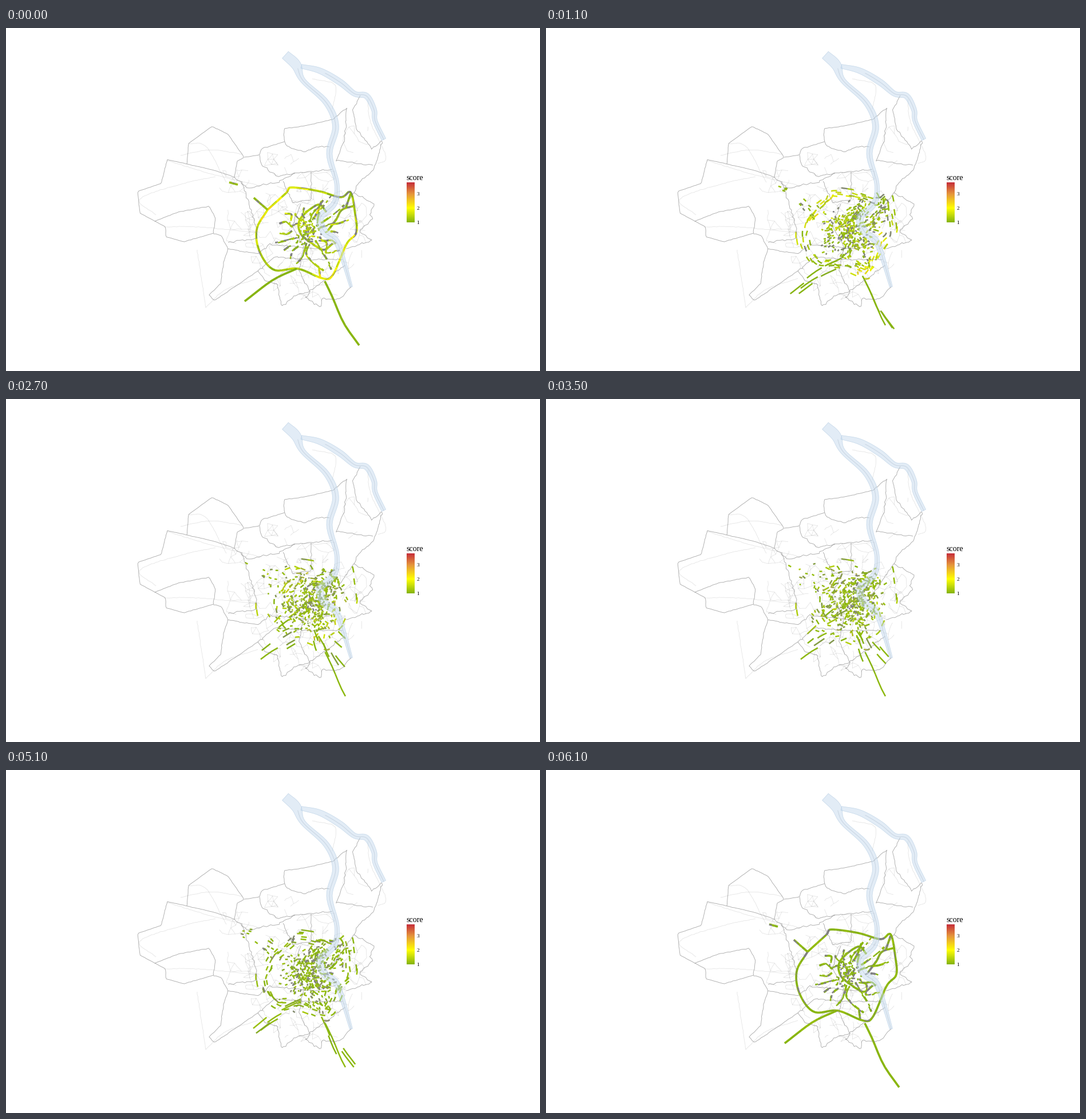
Animation, 933 px wide and 600 px high, one loop 8000 ms. Source, as a matplotlib script:

```python
import numpy as np
import matplotlib.pyplot as plt
from matplotlib.animation import FuncAnimation
from matplotlib.collections import LineCollection
from matplotlib.colors import LinearSegmentedColormap
from matplotlib.patches import Polygon

W, H, DPI = 933, 600, 100
PX = 72 / DPI
STEPS = 29
CENTRE = np.array([528, 358])
rng = np.random.default_rng(12)

SCORE = LinearSegmentedColormap.from_list("score", [
    (0, "#86b410"), (1 / 2.8, "#ffff00"), (2 / 2.8, "#e5953c"), (1, "#c62f3a")])
MISSING = (0.5, 0.5, 0.5, 1)

fig = plt.figure(figsize=(W / DPI, H / DPI), dpi=DPI, facecolor="white")
ax = fig.add_axes([0, 0, 1, 1])


def points(flat, size=2):
    return np.array(flat, float).reshape(-1, size)


def smooth(pts, n=8):
    """Catmull-Rom curve through the points."""
    p = np.vstack([2 * pts[0] - pts[1], pts, 2 * pts[-1] - pts[-2]])
    t = np.linspace(0, 1, n, endpoint=False)[:, None]
    out = [0.5 * (2 * b + (c - a) * t + (2 * a - 5 * b + 4 * c - d) * t**2
                  + (3 * b - a - 3 * c + d) * t**3)
           for a, b, c, d in zip(p, p[1:], p[2:], p[3:])]
    return np.vstack(out + [pts[-1:]])


def measure(pts):
    return np.r_[0, np.cumsum(np.hypot(*np.diff(pts, axis=0).T))]


def along(pts, at):
    d = measure(pts)
    return np.column_stack([np.interp(at, d, pts[:, 0]), np.interp(at, d, pts[:, 1])])


def normals(pts):
    g = np.gradient(pts, axis=0)
    g /= np.hypot(*g.T)[:, None] + 1e-9
    return np.column_stack([-g[:, 1], g[:, 0]])


def rough(pts, amount):
    """Resample a line and give it small kinks; its ends stay put."""
    total = measure(pts)[-1]
    line = along(pts, np.linspace(0, total, max(3, int(total / 4))))
    kinks = rng.normal(0, amount, line.shape)
    kinks[[0, -1]] = 0
    return line + kinks


# base map: municipal limits and local roads
borders, lanes = [], []


def border(*xy, kink=0.8):
    borders.append(rough(points(xy), kink))


def lane(*xy):
    lanes.append(rough(smooth(points(xy)), 0.3))


def web(cx, cy, rx, ry, gap):
    """Streets on a loose grid that fills an ellipse."""
    gx, gy = np.meshgrid(np.arange(-rx, rx + 1, gap), np.arange(-ry, ry + 1, gap))
    p = np.column_stack([gx.ravel(), gy.ravel()])
    p = p[np.hypot(p[:, 0] / rx, p[:, 1] / ry) < 1]
    p = p + rng.uniform(-.42, .42, p.shape) * gap + (cx, cy)
    for i, a in enumerate(p):
        for b in p[i + 1:]:
            if np.hypot(*(a - b)) < 1.25 * gap and rng.random() < .75:
                lanes.append(rough(np.array([a, b]), 0.5))


border(399, 261, 368, 250, 282, 230, 271, 272, 230, 286, 234, 324, 279, 348, 279, 365,
       311, 374, 362, 359, kink=.2)
border(260, 338, 300, 322, 355, 312, 366, 332, 362, 359, 376, 363, 388, 386, 380, 410,
       375, 447, 355, 467, 364, 477, 440, 425, kink=.3)
border(316, 238, 319, 202, 360, 172, 388, 186, 416, 226, 404, 233, 399, 261, kink=.2)
border(416, 226, 443, 222, 446, 211, 487, 199, 485, 176, 523, 171, 571, 160, kink=.3)
border(487, 199, 490, 207, 522, 217, 540, 208, 565, 208)
border(443, 222, 445, 238, 475, 260, 505, 254, 570, 247)
border(571, 160, 595, 139, 592, 195, 577, 232, 620, 238, 641, 240)
border(619, 118, 606, 142, 612, 175, 640, 212, 657, 196, 650, 225, 641, 251, 616, 270, 608, 288)
border(608, 288, 644, 308, 636, 326, 641, 332, 618, 356, 640, 372, 594, 386)
border(440, 425, 452, 441, 474, 448, 482, 487, 505, 468, 530, 461, 524, 472, 550, 488,
       553, 472, 582, 475, 603, 453)
border(399, 261, 420, 280, 475, 270, 505, 254)
border(484, 268, 500, 305, 533, 300, 533, 252)
border(412, 268, 433, 335, 440, 368, 388, 375)
border(388, 386, 440, 395, 462, 379, 540, 386, 576, 376)
border(440, 425, 470, 401, 530, 405, 588, 405)
border(515, 308, 500, 345, 520, 384, 512, 424, 530, 461, 592, 415)
border(608, 288, 576, 335, 560, 346)

lane(535, 89, 575, 100, 570, 142)
lane(632, 124, 637, 165, 664, 225, 650, 237)
lane(305, 223, 358, 213, 413, 221)
lane(319, 202, 350, 208, 385, 270)
lane(282, 232, 365, 257, 445, 276)
lane(262, 327, 234, 299, 310, 272, 366, 260)
lane(277, 348, 335, 348, 440, 358)
lane(334, 388, 349, 489)
lane(349, 489, 383, 458, 440, 438)

web(520, 358, 112, 92, 11)
web(478, 236, 34, 26, 11)
web(400, 268, 36, 28, 12)
web(410, 330, 40, 50, 18)
web(612, 200, 34, 48, 17)
web(612, 335, 28, 48, 14)
web(520, 452, 62, 28, 13)
web(545, 262, 50, 26, 16)

# scored stretches of road: geometry, first colour, last colour
shapes, first, last, held = [], [], [], []


def add(piece, warmth, missing, hold=False):
    """Scores run higher towards the north-west and south-east."""
    dx, dy = piece.mean(axis=0) - CENTRE
    mean = 1 + warmth * (1 + .6 * np.sin(2 * np.arctan2(dy, dx)))
    shapes.append(piece)
    held.append(hold)
    for out, mu, spread in ((first, mean, .5 * warmth), (last, 1.04, .08)):
        score = np.clip(rng.normal(mu, spread), 1, 3.8)
        out.append(MISSING if rng.random() < missing else SCORE((score - 1) / 2.8))


def road(xy, size, warmth=0.25, missing=0.2, skip=0.0, hold=()):
    """Cut both carriageways of a road into short pieces."""
    line = smooth(points(xy))
    for side in (-.6, .6):
        path = line + side * normals(line)
        total = measure(path)[-1]
        cuts = np.linspace(0, total, max(1, round(total / size)) + 1)
        for n, (a, b) in enumerate(zip(cuts, cuts[1:])):
            if rng.random() >= skip:
                add(along(path, np.linspace(a, b, 4)), warmth, missing, side < 0 and n in hold)


# ring road and motorways
road((457, 318, 490, 288, 498, 279, 545, 285, 585, 296, 602, 287, 610, 325, 612, 358, 595, 378,
      571, 432, 553, 438, 510, 421, 468, 423, 443, 391, 438, 352, 457, 318), 11, .55, .12)
road((417, 478, 466, 441, 508, 421), 34, .02, 0, hold=(1,))
road((557, 443, 570, 470, 590, 516, 617, 555), 43, .02, 0, hold=(0, 1))
# boulevards
road((540, 381, 515, 360, 514, 334, 545, 309, 560, 322), 6)
road((562, 355, 577, 335, 587, 318, 609, 311), 7)
road((540, 381, 556, 388, 571, 377), 7)
road((551, 303, 546, 318, 538, 333), 5, 1)
road((602, 290, 594, 314), 5, .2, .4)
road((390, 270, 405, 274), 5, .1, .4)
road((433, 297, 457, 318), 6, .1)
road((547, 420, 549, 437), 6, 1)

# main streets, spreading from the centre
for turn in np.arange(18) * np.pi / 9:
    start, end = rng.uniform(18, 30), rng.uniform(46, 84)
    angle = turn + rng.normal(0, .1, 4)
    ray = np.column_stack([np.cos(angle), .9 * np.sin(angle)])
    street = CENTRE + np.linspace(start, end, 4)[:, None] * ray
    road(street, 5, rng.uniform(.1, .4), rng.uniform(.1, .4), .35)

# dense streets of the centre
for _ in range(90):
    mid = rng.normal(CENTRE - (0, 3), (9, 13))
    angle = rng.choice([.25, 1.75]) + rng.normal(0, .25)
    reach = np.linspace(-.5, .5, 4)[:, None] * rng.uniform(3, 6)
    add(mid + reach * np.array([np.cos(angle), np.sin(angle)]), .3, .25)

# every moving piece travels straight to the place of another one
shapes, first, last = np.array(shapes), np.array(first), np.array(last)
goal = np.arange(len(shapes))
movers = np.flatnonzero(~np.array(held) & (rng.random(len(shapes)) > .06))
goal[movers] = rng.permutation(movers)
target, finish = shapes[goal], last[goal]

traffic = LineCollection(shapes, colors=first, linewidths=2.5 * PX, capstyle="butt", zorder=2)
ax.add_collection(traffic)
ax.add_collection(LineCollection(lanes, colors=[(.5, .5, .5, .25)], linewidths=.7 * PX, zorder=3))
ax.add_collection(LineCollection(borders, colors=[(.5, .5, .5, .65)], linewidths=.9 * PX, zorder=3))


def river(*xyw):
    """Ribbon given by centre points and widths."""
    c = smooth(points(xyw, 3))
    mid, side = c[:, :2], normals(c[:, :2]) * c[:, 2:] / 2
    bank = np.vstack([mid + side, (mid - side)[::-1]])
    ax.add_patch(Polygon(bank, fc=(.776, .859, .937, .5), ec=(.66, .77, .87, .6),
                         lw=.7 * PX, zorder=4))
    ax.plot(*mid[10:].T, color=(.55, .62, .7, .4), lw=.7 * PX, zorder=4)


river(488, 47, 16, 507, 65, 17, 519, 92, 9, 560, 131, 10, 576, 172, 11, 565, 220, 10,
      578, 272, 8, 574, 306, 10, 549, 332, 12, 557, 357, 13, 577, 373, 11, 589, 405, 8, 603, 453, 5)
river(516, 67, 7, 549, 75, 10, 584, 95, 11, 609, 115, 9, 630, 119, 10, 643, 143, 9,
      645, 163, 8, 660, 195, 8)

# legend
ax.imshow(np.linspace(1, 0, 140)[:, None], cmap=SCORE, extent=(700, 714, 340, 270),
          aspect="auto", interpolation="bilinear", zorder=6)
serif = dict(family="Liberation Serif", color="black", va="baseline", zorder=6)
ax.text(699, 266, "score", fontsize=14 * PX, **serif)
for value in (1, 2, 3):
    ax.text(717.5, 368 - 25 * value, str(value), fontsize=9.5 * PX, **serif)

ax.set_xlim(0, W)
ax.set_ylim(H, 0)
ax.axis("off")


def draw(frame):
    step = np.clip((frame * 100 - 500) // 200 + 1, 0, STEPS)
    t = step / STEPS
    traffic.set_segments(shapes + (target - shapes) * t)
    traffic.set_color(first + (finish - first) * t)
    return traffic,


anim = FuncAnimation(fig, draw, frames=80, interval=100, repeat=True, repeat_delay=0)
plt.show()
```
